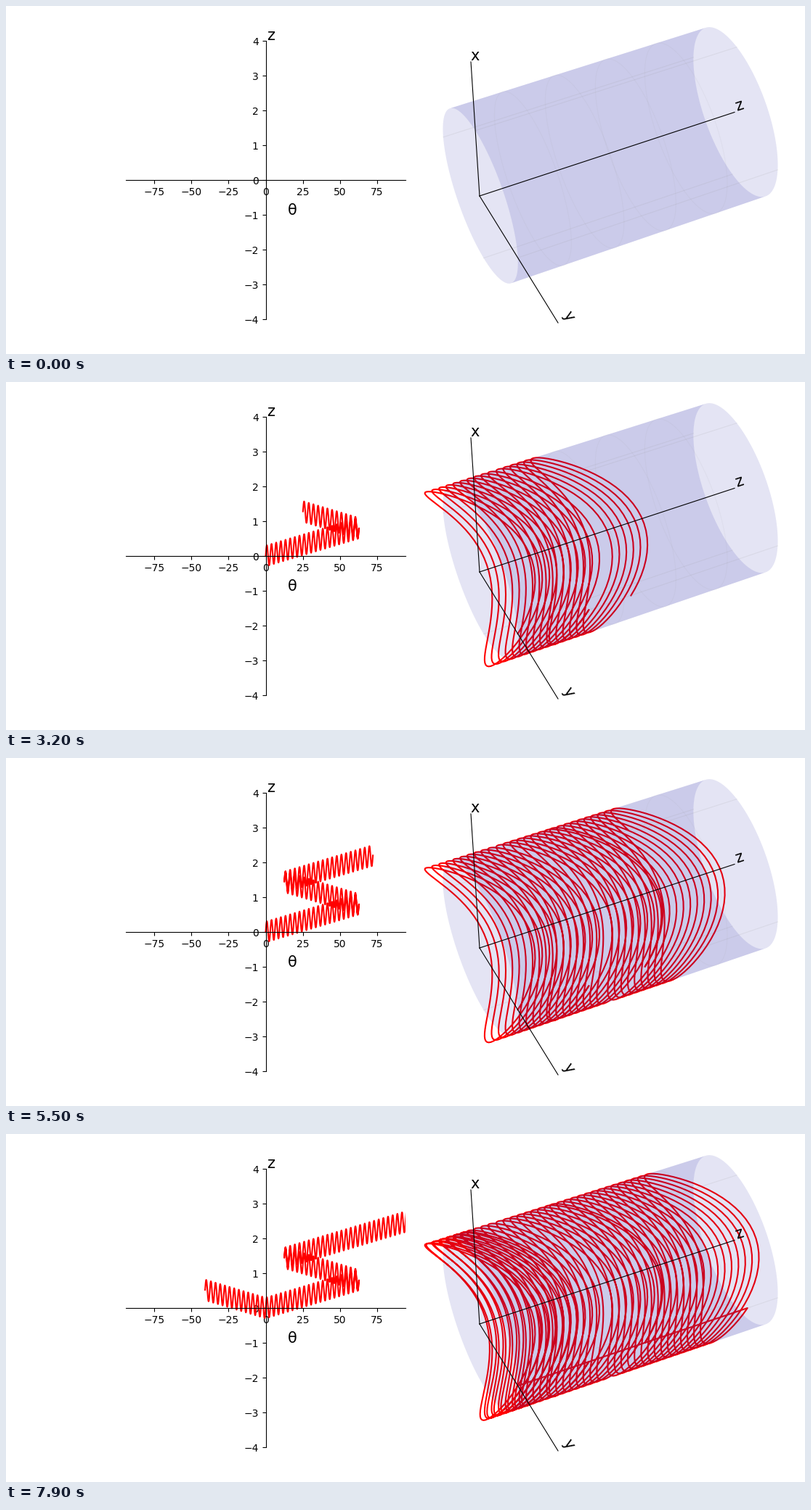
A matplotlib script for the animation above (8 s loop, 1100x480 px).

```python
import numpy as np
import matplotlib.pyplot as plt
from matplotlib.animation import FuncAnimation
from matplotlib.patches import Polygon

W, H, DPI = 1100, 480, 100
FRAMES, INTERVAL = 80, 100
STEP = 40           # samples per frame, one half turn each
JUMP = 66           # frame after which the path restarts at zero
LENGTH = 3          # cylinder length, radius is 1

# Camera: screen position of the origin, of three axis tips, and depth weights
ORIGIN = np.array([652.0, 262.0])
TIPS = [(2, (760, 437)), (LENGTH, (1003, 146.5)), (2, (640, 77))]
DEPTH = np.array([0.0248, -0.01186, 0.0253])
AXES = [((1 - d * n) * np.array(tip) - ORIGIN) / n
        for (n, tip), d in zip(TIPS, DEPTH)]


def project(y, z, x):
    """Perspective view of cylinder coordinates in stage pixels."""
    y, z, x = np.broadcast_arrays(y, z, x)
    pts = np.stack([y, z, x], axis=-1).astype(float)
    return (ORIGIN + pts @ np.array(AXES)) / (1 - pts @ DEPTH)[..., None]


def on_wall(angle, z):
    return project(np.cos(angle), z, np.sin(angle))


def outline_angle(lo, hi):
    """Angle at which the wall turns away from the viewer."""
    t = np.linspace(lo, hi, 4001)
    near, far = on_wall(t, 0), on_wall(t, LENGTH)
    rim, side = np.gradient(near, axis=0), far - near
    return t[np.argmin(np.abs(rim[:, 0] * side[:, 1] - rim[:, 1] * side[:, 0]))]


def make_path():
    """Angle and height along the wavy line, with its restart."""
    s = np.arange(JUMP * STEP + 1) / STEP
    turns = np.interp(s, [0, 20, 36, JUMP], [0, 20, 4, 34])
    back = np.arange((FRAMES - 1 - JUMP) * STEP + 1) / STEP
    theta = np.pi * np.concatenate([turns, -back])
    z = 0.04 * np.concatenate([s, back]) + 0.3 * np.sin(2 * theta)
    return theta, z


fig = plt.figure(figsize=(W / DPI, H / DPI), dpi=DPI, facecolor="white")

# Flat chart
chart = fig.add_axes([0.15, 0.1, 0.35, 0.8])
chart.set(xlim=(-30 * np.pi, 30 * np.pi), ylim=(-4, 4),
          xticks=range(-75, 76, 25), yticks=range(-4, 5))
chart.patch.set_visible(False)
for side in ("left", "bottom"):
    chart.spines[side].set_position("zero")
for side in ("right", "top"):
    chart.spines[side].set_visible(False)

# Cylinder view, in pixels
view = fig.add_axes([0, 0, 1, 1])
view.set(xlim=(0, W), ylim=(H, 0))
view.axis("off")


def label(x, y, text, **style):
    view.text(x, y, text, fontsize=15, va="baseline",
              rotation_mode="anchor", **style)


def wall(start, stop):
    t = np.linspace(start, stop, 200)
    edge = np.vstack([on_wall(t, 0), on_wall(t[::-1], LENGTH)])
    view.add_patch(Polygon(edge, facecolor=(0, 0, 0.6), alpha=0.105,
                           linewidth=0, zorder=3))


top = outline_angle(np.pi / 2, np.pi)
bottom = outline_angle(-np.pi / 2, 0)
wall(bottom, top)
wall(top, bottom + 2 * np.pi)

# Faint patch borders on the wall
for angle in np.arange(4) * np.pi / 2:
    view.plot(*on_wall(angle, np.array([0, LENGTH])).T, color="0.6",
              alpha=0.15, lw=0.8, zorder=4)
for z in (0.6, 1.2, 1.8, 2.4):
    view.plot(*on_wall(np.linspace(0, 2 * np.pi, 200), z).T, color="0.6",
              alpha=0.08, lw=0.8, zorder=4)

for _, tip in TIPS:
    view.plot(*zip(ORIGIN, tip), color="black", lw=0.8, zorder=5)

label(365, 47, "z", ha="center")
label(394, 288, "θ", ha="center")
label(646, 75, "x", ha="center")
label(1006, 145, "z", rotation=18.2)
label(765.5, 426, "y", rotation=-58)

theta, height = make_path()
curve = on_wall(theta, height)
cut = JUMP * STEP + 1
flat = np.column_stack([np.insert(theta, cut, np.nan),
                        np.insert(height, cut, np.nan)])

flat_line, = chart.plot([], [], color="red", lw=1.5)
wall_line, = view.plot([], [], color="red", lw=1.5, zorder=2)


def update(frame):
    count = frame * STEP + 1 if frame else 0
    late = frame > JUMP
    flat_line.set_data(*flat[:count + 2 * late].T)
    wall_line.set_data(*curve[:count + late].T)
    return flat_line, wall_line


anim = FuncAnimation(fig, update, frames=FRAMES, interval=INTERVAL,
                     init_func=lambda: update(0), repeat=True, repeat_delay=0)
plt.show()
```
